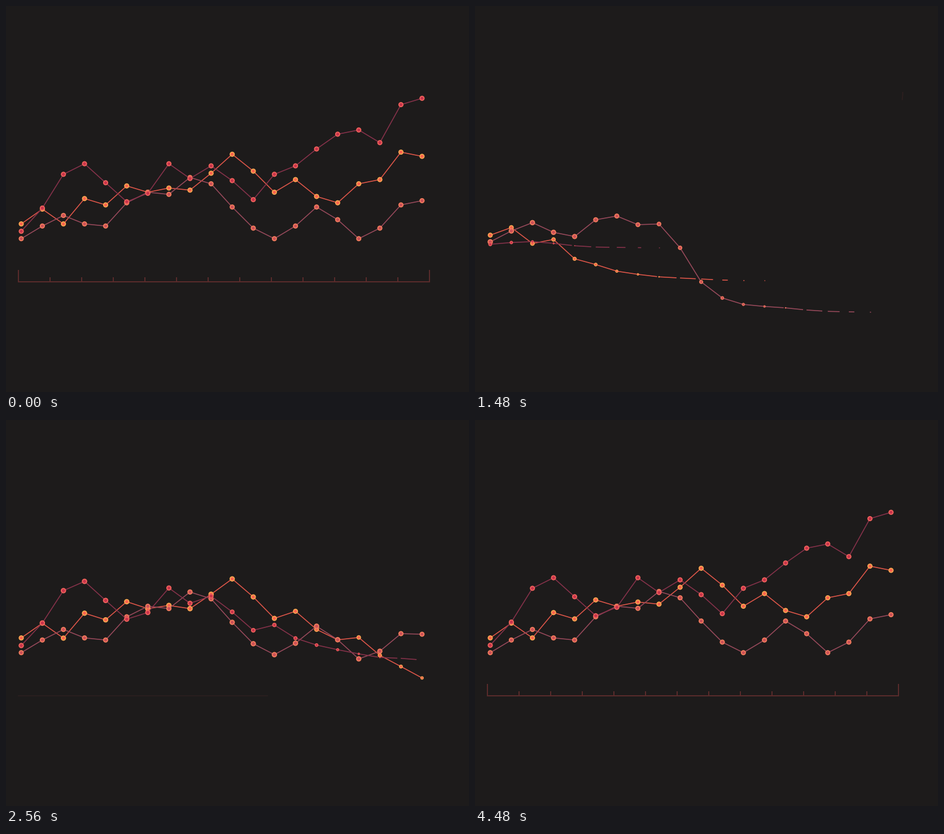
Animation, 820 px wide and 683 px high, one loop 5.52 s. Source, as a matplotlib script:

```python
import numpy as np
import matplotlib.pyplot as plt
from matplotlib.animation import FuncAnimation
from matplotlib.collections import LineCollection

W, H, DPI = 820, 683, 64
STEP, FRAMES, LAST = 40, 138, 112
PT = 72 / DPI                      # points per pixel
BG, AXIS = "#1d1b1b", "#5a2b2b"

COUNT = 20
X = 27 + 37.36 * np.arange(COUNT)
STAGGER, RISE = 80, 2200
FLOOR, UNIT = 411.7, 3.735

# values, baseline y, start ms, line colour, fill colour, ring colour
SERIES = [
    ([7, 14, 7, 19, 16, 25, 22, 24, 23, 31, 40, 32, 22, 28, 20, 17, 26, 28, 41, 39],
     486, 428, "#e2574a", "#ff5f4f", "#fba650"),
    ([0, 6, 11, 7, 6, 17, 22, 21, 29, 26, 15, 5, 0, 6, 15, 9, 0, 5, 16, 18],
     542, -52, "#9a4a5c", "#cc4f58", "#f07c5c"),
    ([3.5, 14.5, 30.5, 35.5, 26.5, 17.5, 21.5, 35.5, 28.5, 34.5,
      27.5, 18.5, 30.5, 34.5, 42.5, 49.5, 51.5, 45.5, 63.5, 66.5],
     428, 788, "#88324b", "#c9324c", "#ee625a"),
]

# cubic-bezier(.65, 0, 0, 1), sampled
S = np.linspace(0, 1, 400)
EASE_X = 3 * 0.65 * S * (1 - S) ** 2 + S ** 3
EASE_Y = 3 * S ** 2 - 2 * S ** 3


def rise(age):
    return np.interp(age / RISE, EASE_X, EASE_Y)


def dot_radius(age):
    grow = 4.9 * (1 - np.exp(-np.maximum(age - 310, 0) / 320))
    return grow - 0.35 * np.clip((age - 1500) / 700, 0, 1)


def link_part(age):
    part = np.interp(age, [0, 92, 172, 252, 332, 412, 492, 650, 900],
                     [0.03, 0.05, 0.26, 0.56, 0.74, 0.83, 0.91, 0.97, 1])
    return np.where(age < 0, 0, part)


def out_cubic(u):
    return 1 - (1 - np.clip(u, 0, 1)) ** 3


fig = plt.figure(figsize=(W / DPI, H / DPI), dpi=DPI, facecolor=BG)
ax = fig.add_axes([0, 0, 1, 1])
ax.set_xlim(0, W)
ax.set_ylim(H, 0)
ax.axis("off")


class Trace:
    def __init__(self, values, base, start, line, fill, ring, z):
        self.base, self.start = base, start
        self.goal = FLOOR - UNIT * np.array(values)
        self.links = LineCollection([], colors=line, linewidths=1.6 * PT,
                                    capstyle="butt", zorder=z)
        ax.add_collection(self.links)
        self.rings = ax.scatter(X, self.goal, c=ring, linewidths=0, zorder=z + 0.1)
        self.cores = ax.scatter(X, self.goal, c=fill, linewidths=0, zorder=z + 0.2)

    def update(self, t):
        age = t - self.start - STAGGER * np.arange(COUNT)
        y = self.base + (self.goal - self.base) * rise(age)
        pts = np.column_stack([X, y])
        part = link_part(age[:-1])[:, None]
        ends = pts[:-1] + (pts[1:] - pts[:-1]) * part
        shown = part[:, 0] > 0
        self.links.set_segments(np.stack([pts[:-1], ends], axis=1)[shown])
        r = dot_radius(age)
        for dots, scale in ((self.rings, 1), (self.cores, 0.58)):
            dots.set_offsets(pts)
            dots.set_sizes((2 * r * scale * PT) ** 2)


class Ruler:
    LEFT, RIGHT, Y, TICKS = 21.8, 750.3, 488.2, 14

    def __init__(self):
        self.line, = ax.plot([], [], color=AXIS, lw=2 * PT, zorder=1,
                             solid_capstyle="projecting")
        xs = np.linspace(self.LEFT, self.RIGHT, self.TICKS)
        tall = [21 if i in (0, self.TICKS - 1) else 8 for i in range(self.TICKS)]
        self.ticks = [(x, h, ax.plot([], [], color=AXIS, lw=2 * PT, zorder=1,
                                     solid_capstyle="butt")[0])
                      for x, h in zip(xs, tall)]

    def update(self, t):
        u = np.clip((t - 2320) / 900, 0, 1)
        end = self.LEFT + (self.RIGHT - self.LEFT) * out_cubic(u)
        self.line.set_data([self.LEFT, end], [self.Y, self.Y])
        self.line.set_alpha(u ** 1.2)
        for i, (x, h, tick) in enumerate(self.ticks):
            grow = out_cubic((t - 2720 - 28 * i) / 700)
            tick.set_data([x, x], [self.Y, self.Y - h * grow])
            tick.set_alpha(grow)


class Arc:
    TOP, BOTTOM, RIGHT = 152, 538, 757.6

    def __init__(self):
        self.line, = ax.plot([], [], color=AXIS, lw=1.8 * PT, zorder=1,
                             solid_capstyle="butt")

    def update(self, t):
        head = out_cubic((t - 536) / 816)
        v = (t - 1054) / 640
        tail = out_cubic(v)
        s = np.linspace(tail, head, 60)
        y = self.BOTTOM + (self.TOP - self.BOTTOM) * s
        self.line.set_data(self.RIGHT - 0.00493 * (y - self.TOP) ** 2, y)
        self.line.set_alpha(0.8 * (1 - np.clip(v, 0, 1)))
        self.line.set_visible(head > tail)


parts = [Arc(), Ruler()]
parts += [Trace(*spec, z=2 + i) for i, spec in enumerate(SERIES)]


def draw(k):
    # the loop opens and rests on the finished chart
    t = 9999 if k == 0 or k >= LAST else k * STEP
    for part in parts:
        part.update(t)
    return []


anim = FuncAnimation(fig, draw, frames=FRAMES, interval=STEP,
                     init_func=lambda: draw(0), repeat=True, repeat_delay=0,
                     blit=False)
plt.show()
```
